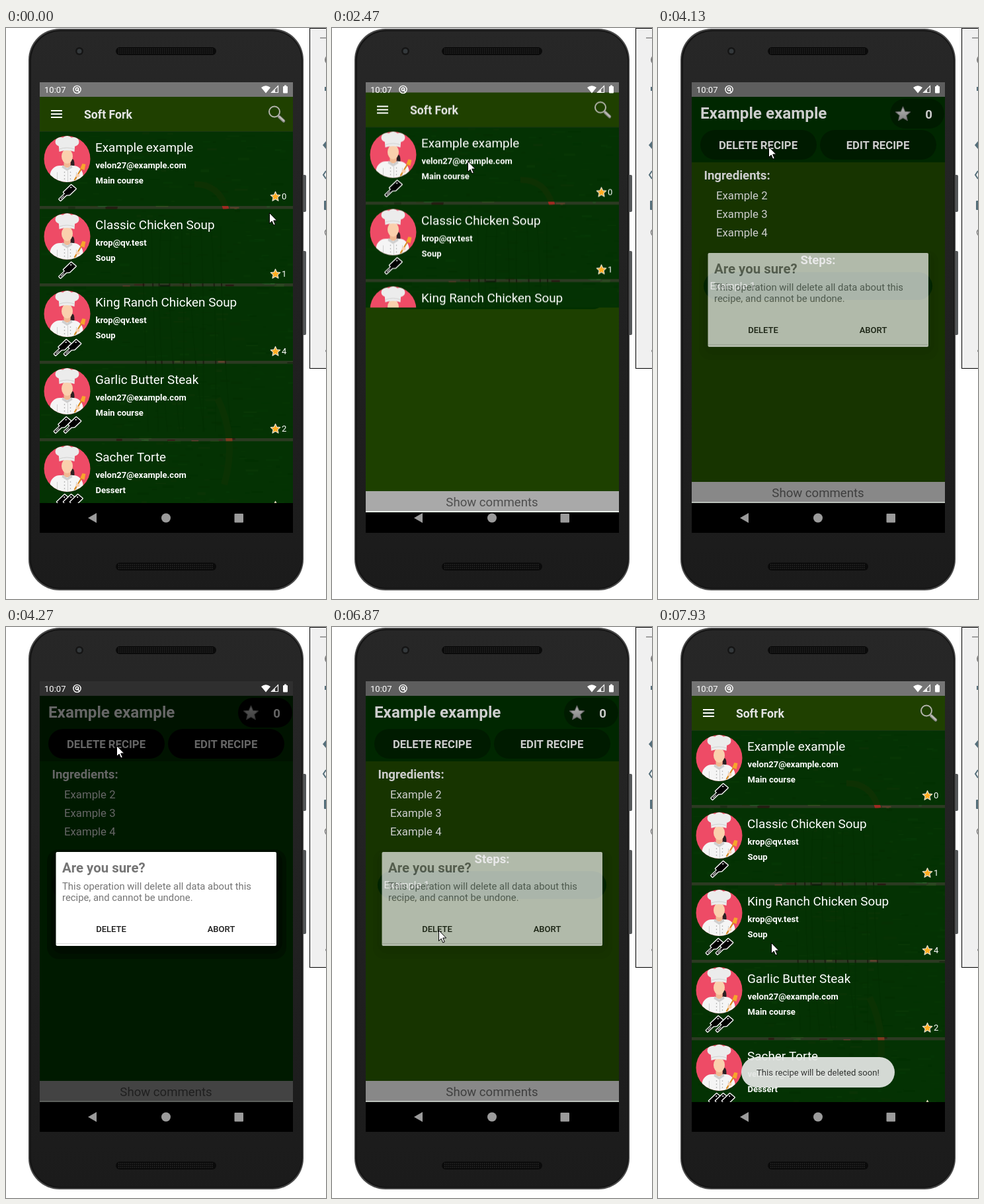
These frames come from a looping animation (484 px wide and 863 px high, 8000 ms). An HTML page with a canvas:

```html
<!DOCTYPE html>
<html lang="en">
<head>
<meta charset="utf-8">
<title>Recipe app</title>
<style>
html, body { margin: 0; width: 484px; height: 863px; overflow: hidden; background: #fff; }
canvas { display: block; }
</style>
</head>
<body>
<canvas id="stage" width="484" height="863"></canvas>
<script>
const W = 484, H = 863, LOOP = 8000, TICK = 200 / 3;
const LEFT = 51, TOP = 82, WIDE = 383, TALL = 681;
const stage = document.getElementById('stage').getContext('2d');
let c = stage;

// ---------- helpers ----------
function box(x, y, w, h, fill) { c.fillStyle = fill; c.fillRect(x, y, w, h); }

const bar = (y, h, fill) => box(LEFT, y, WIDE, h, fill);

function round(x, y, w, h, r, fill) {
  c.beginPath();
  c.roundRect(x, y, w, h, r);
  c.fillStyle = fill;
  c.fill();
}

function oval(x, y, rx, ry, fill) {
  c.beginPath();
  c.ellipse(x, y, rx, ry, 0, 0, 7);
  c.fillStyle = fill;
  c.fill();
}

function ring(x, y, r, width, color) {
  c.beginPath();
  c.arc(x, y, r, 0, 7);
  c.lineWidth = width;
  c.strokeStyle = color;
  c.stroke();
}

function shape(points, fill, stroke, width = 1) {
  const path = new Path2D('M' + points + 'Z');
  if (stroke) { c.strokeStyle = stroke; c.lineWidth = width; c.stroke(path); }
  if (fill) { c.fillStyle = fill; c.fill(path); }
}

function line(points, color, width = 1) {
  c.strokeStyle = color;
  c.lineWidth = width;
  c.stroke(new Path2D('M' + points));
}

function text(str, x, y, size, color = '#fff', weight = 400, align = 'left') {
  c.font = `${weight} ${size}px Roboto, sans-serif`;
  c.textAlign = align;
  c.fillStyle = color;
  c.fillText(str, x, y);
}

function star(x, y, r, fill, edge) {
  c.beginPath();
  for (let i = 0; i < 10; i++) {
    const a = i * Math.PI / 5 - Math.PI / 2, d = i % 2 ? r * 0.47 : r;
    c.lineTo(x + d * Math.cos(a), y + d * Math.sin(a));
  }
  c.closePath();
  c.fillStyle = fill;
  c.fill();
  c.lineWidth = 1.2;
  c.lineJoin = 'round';
  c.strokeStyle = edge;
  c.stroke();
}

function fade(y0, y1, from, to) {
  const g = c.createLinearGradient(0, y0, 0, y1);
  g.addColorStop(0, from);
  g.addColorStop(1, to);
  return g;
}

function random(seed) {
  return () => (seed = (seed * 16807) % 2147483647) / 2147483647;
}

function layer(draw) {
  const el = document.createElement('canvas');
  el.width = W;
  el.height = H;
  c = el.getContext('2d');
  draw();
  c = stage;
  return el;
}

const ramp = (t, from, to) => Math.min(1, Math.max(0, (t - from) / (to - from)));
const smooth = p => p * p * (3 - 2 * p);

// ---------- device ----------
function speaker(y) {
  round(166, y - 6, 152, 12, 6, '#0b0b0b');
  for (let i = 0; i < 144; i++)
    box(170 + (i % 48) * 3, y - 4 + Math.floor(i / 48) * 3, 1.5, 1.5, '#2b2b2b');
}

function device() {
  box(0, 0, W, H, '#fff');
  round(446, 222, 8, 56, 2, '#55585a');
  round(446, 337, 8, 127, 2, '#55585a');
  round(34, 1, 416, 849, 47, '#4a4a4a');
  round(35.5, 3, 413, 845, 46, '#141414');
  round(38, 5, 409, 841, 44, fade(0, 850, '#272727', '#1b1b1b'));
  oval(111, 35, 6, 6, '#151515');
  oval(111, 35, 3.5, 3.5, '#34393c');
  speaker(35);
  speaker(814);

  // emulator side panel
  box(459, 0, 25, 515, '#000');
  box(460, 1, 24, 513, '#f0f0f0');
  const ink = '#546e7a', dim = '#7c7c7c';
  box(475, 14, 9, 2, '#a0a0a0');
  ring(490, 48, 7, 2, dim);
  box(482, 89, 2, 6, ink);
  shape('484,171 479,177 484,183', ink);
  line('484,216 480,222 484,228', ink, 2);
  round(481, 261, 6, 14, 1, ink);
  ring(488, 309, 5.5, 1.5, dim);
  oval(485, 488, 2, 2, dim);
}

function icons() {
  text('10:07', 58, 98, 13.04);
  ring(107.5, 93, 5.6, 1.4, '#fff');
  ring(107.5, 92.5, 2.2, 1.4, '#fff');
  line('108,93 111,97', '#fff', 1.4);
  shape('393,98.5 386,90 Q393,84.5 400,90', '#fff');
  shape('411.5,87.5 v10 h-10', null, '#fff', 1.1);
  shape('407,93 v5 h-5', '#fff');
  round(419, 88, 7, 10.5, 1, '#fff');
  box(421, 86.5, 3, 2, '#fff');

  const grey = '#9b9b9b';
  shape('124,740.5 l13,-7.5 v15', grey);
  oval(242, 740.5, 7, 7, grey);
  round(345.5, 734, 13.5, 13.5, 1, grey);
}

function bars() {
  bar(TOP, 22, '#757575');
  bar(718, 45, '#000');
}

// ---------- recipe list ----------
function photo() {
  const rnd = random(77);
  bar(156, 562, '#2c3a22');
  for (let i = 0; i < 700; i++) {
    const x = LEFT + rnd() * WIDE, warm = x > 150 && x < 350 && rnd() < 0.6;
    const hue = warm ? 8 + rnd() * 22 : 80 + rnd() * 40;
    box(x, 156 + rnd() * 562, 4 + rnd() * 16, 1 + rnd() * 3, `hsl(${hue} 35% ${8 + rnd() * 24}%)`);
  }
  for (let i = 0; i < 9; i++)
    line(`${205 + i * 15},300 q${rnd() * 24 - 12},120 ${rnd() * 20},310`, 'rgba(20,12,8,.6)', 2);
  line('285,236 q38,0 48,38', '#a02a22', 9);
  line('320,560 q30,60 10,130', '#7c3a20', 10);
}

// Drawn around the centre of a 70px disc
function chef(y) {
  const white = '#f5f5f5', shade = '#cfcfcf', skin = '#fad0ad';
  c.save();
  c.translate(92.5, y);
  c.beginPath();
  c.arc(0, 0, 35, 0, 7);
  c.fillStyle = '#ee4b66';
  c.fill();
  c.clip();
  oval(8, 8, 3, 8, '#2c2022');
  round(-26, 10, 50, 40, 15, white);
  round(-5, 0, 10, 13, 4, '#f0b993');
  oval(0, -4, 8.5, 11, skin);
  shape('-7,9 L0,14 7,9 8,13 0,18 -8,13', shade);
  line('-15,20 v16 M14,20 v16 M1,18 v18', shade);
  for (let i = 0; i < 6; i++) oval(i % 2 ? 5 : -4, 20 + (i >> 1) * 5, 0.8, 0.8, '#999');
  for (let i = 0; i < 3; i++) oval(i * 10 - 10, -26 - (i % 2) * 2, 8, 7, '#ececec');
  shape('-13,-24 h25 l-1,13 q-11,-4 -23,0', '#ececec');
  line('-12,-15 q12,-4 23,0', shade);
  line('11,32 l11,-18', '#d98a1e', 2.2);
  shape('20,14 l3,-7 5,1 -2,9', '#f6a62c');
  oval(16, 25, 3, 2.6, skin);
  c.restore();
}

function cleaver(x, y) {
  const blade = '-15,-1 h12 v-3 h16 l1,9 h-13 l-4,-3 h-12';
  c.save();
  c.translate(x, y);
  c.rotate(-0.76);
  c.lineJoin = 'round';
  shape(blade, '#000', '#fff', 2.6);
  line('-13,.5 h7', '#fff');
  oval(10, -1.5, 1, 1, '#fff');
  c.restore();
}

const MAIL_A = 'velon27@example.com', MAIL_B = 'krop@qv.test';
const recipes = [
  ['Example example', MAIL_A, 'Main course', 1, 0],
  ['Classic Chicken Soup', MAIL_B, 'Soup', 1, 1],
  ['King Ranch Chicken Soup', MAIL_B, 'Soup', 2, 4],
  ['Garlic Butter Steak', MAIL_A, 'Main course', 2, 2],
  ['Sacher Torte', MAIL_A, 'Dessert', 3, 3]
];

function list() {
  photo();
  recipes.forEach(([name, mail, kind, level, stars], i) => {
    const y = i * 117;
    bar(156.5 + y, 112.5, 'rgba(0,50,0,.91)');
    chef(198 + y);
    text(name, 135, 186.5 + y, 18.9);
    text(mail, 135.5, 211.5 + y, 13.04, '#fff', 700);
    text(kind, 135.5, 235 + y, 13.04, '#fff', 700);
    const gap = level === 2 ? 15 : 10;
    for (let k = 0; k < level; k++) cleaver(92 + (k - (level - 1) / 2) * gap, 249 + y);
    star(407.5, 255 + y, 7.6, '#ffad1f', '#e8e0d0');
    text(stars, 417, 259 + y, 13.04);
  });
  bar(104, 52, '#1f4000');
  for (let i = 0; i < 3; i++) box(68, 124 + i * 5, 17, 2, '#fff');
  text('Soft Fork', 118, 137, 17.7, '#e4e4e4', 700);
  c.lineCap = 'round';
  line('413,134 l7,6.5', '#8c8c8c', 4.5);
  line('413.5,134 l6.5,6', '#c4c4b8', 2);
  ring(406, 126.5, 8, 2, '#b4b4ac');
  bars();
}

// ---------- recipe details ----------
function details(body, chip) {
  bar(104, 99, '#003000');
  bar(203, 483, body);
  round(351, 107, 82, 45, 22.5, chip);
  star(370.5, 130.5, 11.5, fade(118, 142, '#e2e2e2', '#9c9c9c'), '#777');
  text('Example example', 64, 137, 24.2, '#fff', 700);
  text('0', 409.5, 136.5, 18.63, '#fff', 700, 'center');
  ['DELETE RECIPE', 'EDIT RECIPE'].forEach((label, i) => {
    round(64 + i * 181, 154, 176, 45, 22.5, chip);
    text(label, 151.5 + i * 181, 183, 16.76, '#fff', 700, 'center');
  });
  text('Ingredients:', 69.5, 228.5, 18.63, '#fff', 700);
  for (let i = 0; i < 3; i++) text('Example ' + (i + 2), 88, 259 + i * 28, 16.76);
  text('Steps:', 242, 356.5, 18.63, '#fff', 700, 'center');
  round(69, 369, 346, 42, 21, '#003000');
  text('Example 1', 78.5, 395, 14.9);
  bar(686, 32, '#a9a9a9');
  bar(716, 2, '#e8f0e8');
  text('Show comments', 242, 708.5, 18.63, '#4e4e4e', 400, 'center');
  bars();
}

function dialog() {
  const grey = '#757575';
  round(75.5, 340, 333.5, 142, 2, '#fff');
  box(76, 478, 332, 1, '#dcdcdc');
  text('Are you sure?', 85, 371, 20.4, grey, 700);
  text('This operation will delete all data about this', 85, 396.5, 14.85, grey);
  text('recipe, and cannot be undone.', 85, 414, 14.85, grey);
  text('DELETE', 159, 460.5, 13.04, '#1c1c1c', 500, 'center');
  text('ABORT', 325.5, 460.5, 13.04, '#1c1c1c', 500, 'center');
}

function toast() {
  round(126, 650, 232, 46, 23, '#e4e6e4');
  text('This recipe will be deleted soon!', 149, 678, 13.1, '#333');
}

function cursor([x, y]) {
  c.save();
  c.translate(Math.round(x) + 0.5, Math.round(y) + 0.5);
  c.lineJoin = 'miter';
  const arrow = '0,0 v16 l3.7,-3.5 2.6,6 2.5,-1 -2.6,-6 h5';
  shape(arrow, '#fff');
  shape(arrow, null, '#000');
  c.restore();
}

const base = layer(device), iconView = layer(icons), listView = layer(list);
const detailView = layer(() => details('#1d4000', '#002200'));
const shadedView = layer(() => details('#004000', '#000'));
const dialogView = layer(dialog), toastView = layer(toast);

// ---------- timeline ----------
// Moves: start, end, x, y and an optional bend point
const moves = [
  [133, 267, 383, 280],
  [533, 1400, 205, 203],
  [3067, 3600, 167, 179, 195, 262],
  [4933, 5800, 138, 489, 13, 316],
  [5800, 6067, 161, 453],
  [6800, 7133, 161, 477],
  [7400, 7600, 169, 477],
  [7867, 7933, 171, 477]
];

function pointer(t) {
  let x = 398, y = 279;
  for (const [from, to, ex, ey, bx = (x + ex) / 2, by = (y + ey) / 2] of moves) {
    if (t < from) break;
    const p = ramp(t, from, to);
    const bend = (a, b, e) => (1 - p) ** 2 * a + 2 * p * (1 - p) * b + p * p * e;
    [x, y] = [bend(x, bx, ex), bend(y, by, ey)];
  }
  return [x, t > 1433 && t < 2967 ? y - 2 : y];
}

// How far the details page is open: quick rise, smooth fall
function opened(t) {
  if (t < 2433) return 0;
  const rise = t < 2800 ? 1 - 0.5 * 0.45 ** ((t - 2467) / TICK) : 1;
  return rise * (1 - smooth(ramp(t, 7267, 7600)));
}

function put(view, alpha = 1, dy = 0) {
  c.globalAlpha = alpha;
  c.drawImage(view, 0, dy);
  c.globalAlpha = 1;
}

function clip(top) {
  c.save();
  c.beginPath();
  c.rect(LEFT, top, WIDE, TOP + TALL - top);
  c.clip();
}

function render(t) {
  const page = opened(t);
  const modal = ramp(t, 4000, 4267) - ramp(t, 6733, 7000);
  const dim = 0.6 * modal ** 1.6, card = 1 - (1 - modal) ** 1.6;

  put(base);
  clip(TOP);
  bar(TOP, TALL, '#000');
  put(listView, 1, -13 * page);
  if (page > 0) {
    clip(TOP + TALL * (1 - page));
    put(modal > 0.9 ? shadedView : detailView, 1, Math.round(28 * (1 - page)));
    c.restore();
  }
  bar(TOP, 636, `rgba(0,0,0,${dim})`);
  for (let i = 0; i < 2; i++)
    round(62 + i * 6, 336 + i * 2, 362 - i * 12, 166 - i * 10, 18, `rgba(0,0,0,${dim * modal / 2})`);
  c.restore();

  put(iconView);
  put(dialogView, card);
  put(toastView, 0.93 * ramp(t, 7133, 7367));
  cursor(pointer(t));
}

let last = -1;
function loop(now) {
  const tick = Math.floor((now % LOOP + 5) / TICK) % 120;
  if (tick !== last) {
    last = tick;
    render(Math.round(tick * TICK));
  }
  requestAnimationFrame(loop);
}
render(0);
requestAnimationFrame(loop);
</script>
</body>
</html>
```
